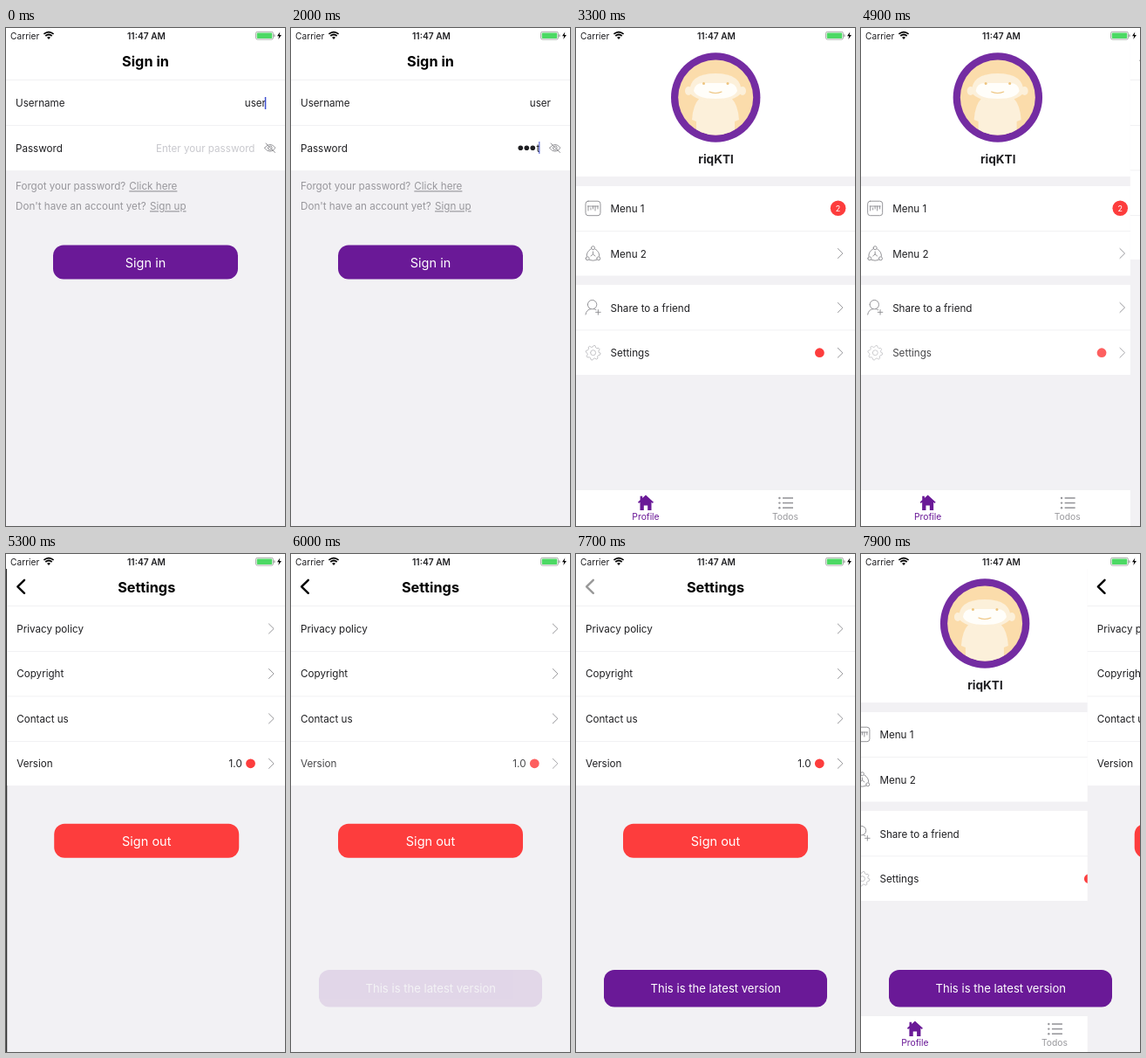
Write an HTML page that moves like this. It is 320 px wide and 570 px high and loops after 8000 ms.

```html
<!DOCTYPE html>
<html lang="en">
<head>
<meta charset="utf-8">
<title>Sign-in flow</title>
<style>
html, body { margin: 0; width: 100%; height: 100%; overflow: hidden; background: #333; }
svg { display: block; width: 320px; height: 570px; font: 11.65px Inter, Roboto, sans-serif; fill: #1f1f22; }
.title { font-size: 16.3px; font-weight: 700; fill: #000; text-anchor: middle; }
.mid { text-anchor: middle; }
.end { text-anchor: end; }
.big { font-size: 14.5px; fill: #fff; text-anchor: middle; }
.hint { fill: #98979c; }
.link { text-decoration: underline; }
.icon { fill: none; stroke: #8a8a8e; stroke-width: .9; stroke-linecap: round; stroke-linejoin: round; }
</style>
</head>
<body>
<svg id="stage" viewBox="0 0 320 570"></svg>
<script>
const PURPLE = '#6a1997', RED = '#fd3d3d', GREY = '#f2f1f4';
const PERIOD = 8000, W = 320;

// Markup helpers
const rect = (x, y, w, h, fill, more = '') =>
  `<rect x="${x}" y="${y}" width="${w}" height="${h}" fill="${fill}" ${more}/>`;
const text = (x, y, s, cls = '', more = '') =>
  `<text x="${x}" y="${y}" class="${cls}" ${more}>${s}</text>`;
const dot = (x, y, r, fill) => `<circle cx="${x}" cy="${y}" r="${r}" fill="${fill}"/>`;
const icon = (d, more = '') => `<path class="icon" d="${d}" ${more}/>`;
const ring = (x, y, r) => `M${x - r} ${y}a${r} ${r} 0 1 0 ${2 * r} 0a${r} ${r} 0 1 0 ${-2 * r} 0`;
const line = y => rect(0, y, W, .8, '#eeeef0');
const chevron = y => icon(`M300.3 ${y - 5.5}l5.6 5.5l-5.6 5.5`);
const group = (id, body) => `<g id="${id}">${body}</g>`;
const button = (id, y, label, fill) =>
  group(id, rect(54, y, 212, 39, fill, 'rx="12"') + text(160, y + 25, label, 'big'));
const caret = (id, x, y) => group(id, rect(x, y, 1.5, 14, '#3f4fd0'));
const page = (id, body) => group(id, rect(0, 0, W, 570, GREY) + body);

const gear = (x, y) => {
  let d = '';
  for (let i = 0; i < 32; i++) {
    const a = (i + .5) * Math.PI / 16, r = i % 4 < 2 ? 8.4 : 6.6;
    d += (i ? 'L' : 'M') + (x + r * Math.cos(a)).toFixed(1) + ' ' + (y + r * Math.sin(a)).toFixed(1);
  }
  return icon(d + 'Z' + ring(x, y, 3), 'style="stroke:#bdbdc0"');
};

const signIn = rect(0, 0, W, 163, '#fff') + text(160, 44, 'Sign in', 'title') + line(59) + line(111) +
  text(11, 90, 'Username') + text(298, 90, 'user', 'end') + caret('userCaret', 296.8, 79) +
  text(11, 141.5, 'Password') +
  text(285.5, 141.5, 'Enter your password', 'end', 'id="placeholder" fill="#c9c9ce"') +
  group('secret', '') + caret('passCaret', 284, 130) +
  icon('M296.5 137.3q6.3-8 12.6 0q-6.3 8-12.6 0' + ring(302.8, 137.3, 2.3) + 'M298 132l10.5 10.5') +
  text(11, 185.3, 'Forgot your password?', 'hint') + text(141.3, 185.3, 'Click here', 'hint link') +
  text(11, 208.3, "Don't have an account yet?", 'hint') + text(165, 208.3, 'Sign up', 'hint link') +
  button('signBtn', 248.5, 'Sign in', PURPLE);

const avatar = dot(160.2, 79.5, 51.2, '#742ca2') + dot(160.2, 79.5, 43, '#fbdcab') +
  `<g clip-path="url(#face)" fill="#fcf0da">
    <path d="M142 80h36q8 8 9 25l-5 2v18h-44v-18l-5-2q1-17 9-25z"/>
    <ellipse cx="129" cy="72" rx="4" ry="5"/><ellipse cx="191" cy="72" rx="4" ry="5"/>
    <path d="M130 74q0-22 30-22q30 0 30 22q-8 10-30 10q-22 0-30-10z"/>
    <path d="M135 72q1-9 11-9h28q10 0 11 9q-4 9-25 9q-21 0-25-9z" fill="#fffefa"/>
  </g>` + dot(146.5, 63.5, 1.5, '#edc47f') + dot(174, 63.5, 1.5, '#edc47f') +
  icon('M153 73q7 3 14 0', 'style="stroke:#edc47f;stroke-width:1.2"');

const home = `<path fill="${PURPLE}" d="M80 534.5l9 8.2-1.1 1.2-1.4-1.2v9.3h-4.3v-5.4h-4.4v5.4h-4.3v-9.3l-1.4 1.2-1.1-1.2 2.6-2.4v-4.6h2.6v2.3z"/>`;
const list = [538, 543.6, 549.2].map(y =>
  dot(233.4, y, 1.2, '#98989c') + rect(237, y - .8, 12, 1.6, '#98989c')).join('');

const profile = rect(0, 0, W, 170, '#fff') + avatar +
  text(160.5, 155, 'riqKTl', 'mid', 'font-size="13.6" font-weight="700"') +
  rect(0, 181, W, 102.5, '#fff') + line(232) + rect(0, 294, W, 103, '#fff') + line(345.5) +
  icon('M14 198.2h11q3 0 3 3v10.5q0 3-3 3h-11q-3 0-3-3v-10.5q0-3 3-3zM13.5 204h12M14 204v5M17 206v2M19.5 204v3M22 204v5M25 204v3') +
  text(39.5, 211, 'Menu 1') + dot(300.6, 206.3, 8.8, RED) +
  text(300.6, 209.6, '2', 'mid', 'font-size="9" style="fill:#fff"') +
  icon(ring(19.5, 251.7, 2) + ring(13.2, 263.8, 2) + ring(25.8, 263.8, 2) +
    'M17 253q-5 3-4.8 8.2M22 253q5 3 4.8 8.2M15.5 265.5q4 1.5 8 0M19.5 256v3l-2.5 2M19.5 259l2.5 2') +
  text(39.5, 262.5, 'Menu 2') + chevron(258) +
  icon(ring(18.6, 316.6, 5.2) + 'M11 328q1-6 6-6.4M20.5 321.6q1.5 .3 2.5 1M22.6 325.3h5.6M25.4 322.5v5.6') +
  text(39.5, 324.5, 'Share to a friend') + chevron(320) +
  group('settingsRow', gear(19.6, 371.7) + text(39.5, 376, 'Settings') + dot(279.4, 371.7, 5.4, RED) + chevron(371.7)) +
  rect(0, 528, W, 42, '#fff') + line(528) + home + list +
  text(80, 563, 'Profile', 'mid', `font-size="10.3" style="fill:${PURPLE}"`) +
  text(240, 563, 'Todos', 'mid', 'font-size="10.3" style="fill:#98989c"');

const rowY = [85.5, 137, 188.4, 239.8];
const settings = rect(0, 0, W, 265, '#fff') + text(160, 44, 'Settings', 'title') +
  group('back', icon('M19.8 29.8l-7.7 7.5l7.7 7.5', 'style="stroke:#000;stroke-width:2.4"')) +
  [59, 111, 162.5, 214].map(line).join('') +
  ['Privacy policy', 'Copyright', 'Contact us'].map((s, i) =>
    text(11, rowY[i] + 4.4, s) + chevron(rowY[i])).join('') +
  group('versionRow', text(11, rowY[3] + 4.4, 'Version') + text(269.5, rowY[3] + 4.4, '1.0', 'end') +
    dot(279.3, rowY[3], 5.4, RED) + chevron(rowY[3])) +
  button('outBtn', 308.8, 'Sign out', RED);

const statusBar = rect(0, 0, W, 17, '#fff') +
  text(5, 12.6, 'Carrier', '', 'font-size="10.2"') +
  text(161, 12.6, '11:47 AM', 'mid', 'font-size="10.2" font-weight="600"') +
  `<path d="M49 13l-2-2.2q2-1.6 4 0z" fill="#000"/>` +
  icon('M45.3 9q3.7-3 7.4 0M43.4 6.9q5.6-4.6 11.2 0', 'style="stroke:#000;stroke-width:1.7;stroke-linecap:butt"') +
  rect(286.5, 4.3, 20, 8.8, 'none', 'rx="2" stroke="#999" stroke-width=".8"') +
  rect(287.7, 5.5, 17.6, 6.4, '#4cd964', 'rx="1"') + rect(307.3, 7.2, 1.2, 3, '#999', 'rx=".6"') +
  `<path d="M314.3 4.6l-3.3 4.6h2.2l-.9 3.8l3.6-4.9h-2.3z" fill="#000"/>`;

const toast = group('toast', rect(32, 476, 256, 42.5, PURPLE, 'rx="12"') +
  text(160.3, 501.9, 'This is the latest version', 'mid', 'font-size="13.1" style="fill:#fff"'));

stage.innerHTML = `<clipPath id="face"><circle cx="160.2" cy="79.5" r="43"/></clipPath>` +
  page('signPage', signIn) + page('profilePage', profile) + page('settingsPage', settings) + statusBar + toast;

const $ = id => document.getElementById(id);
const clamp = v => Math.min(1, Math.max(0, v));

// cubic-bezier(.2833, .99, .31833, .99) over 500 ms
function slide(t, start) {
  const u = clamp((t - start) / 500);
  if (u === 0 || u === 1) return u;
  let lo = 0, hi = 1, s;
  for (let i = 0; i < 24; i++) {
    s = (lo + hi) / 2;
    const x = .85 * s * (1 - s) ** 2 + .955 * s * s * (1 - s) + s ** 3;
    if (x < u) lo = s; else hi = s;
  }
  return 2.97 * s * (1 - s) + s ** 3;
}

const fade = (id, v) => $(id).setAttribute('opacity', v);
const press = (id, t, start, low = .82, hold = 100) =>
  fade(id, t < start ? 1 : low + (1 - low) * clamp((t - start - hold) / 200));

function place(id, x, visible) {
  $(id).setAttribute('transform', `translate(${x.toFixed(2)})`);
  $(id).setAttribute('visibility', visible ? 'visible' : 'hidden');
}

const KEYS = [[900, 'd'], [1000, 'a'], [1200, 'r'], [1400, 't']];
let shown = -1;

function typePassword(t) {
  const typed = KEYS.filter(k => t >= k[0]).length;
  if (typed === shown) return;
  shown = typed;
  fade('placeholder', typed ? 0 : 1);
  let s = typed ? text(285.3, 141.5, KEYS[typed - 1][1], 'end') : '';
  for (let i = 1; i < typed; i++) s += dot(284.3 - 7 * i, 137.3, 2.8, '#1f1f22');
  $('secret').innerHTML = s;
}

function draw(t) {
  const enter = slide(t, 2596);
  const open = slide(t, 4896) - slide(t, 7750);
  place('signPage', -.3 * W * enter, enter < .99);
  place('profilePage', W * (1 - enter) - .3 * W * open, enter > 0 && open < .99);
  place('settingsPage', W * (1 - open), open > 0);

  typePassword(t);
  fade('userCaret', t < 400 ? 1 : 0);
  fade('passCaret', t < 400 ? 0 : 1 - clamp((t - 1920) / 250));
  press('signBtn', t, 2600);
  press('settingsRow', t, 4900);
  press('versionRow', t, 5900);
  press('back', t, 7700, .4, 0);

  const k = clamp((t - 5880) / 560);
  fade('toast', k * k * (3 - 2 * k));
}

function tick() {
  draw(performance.now() % PERIOD);
  requestAnimationFrame(tick);
}
tick();
</script>
</body>
</html>
```
